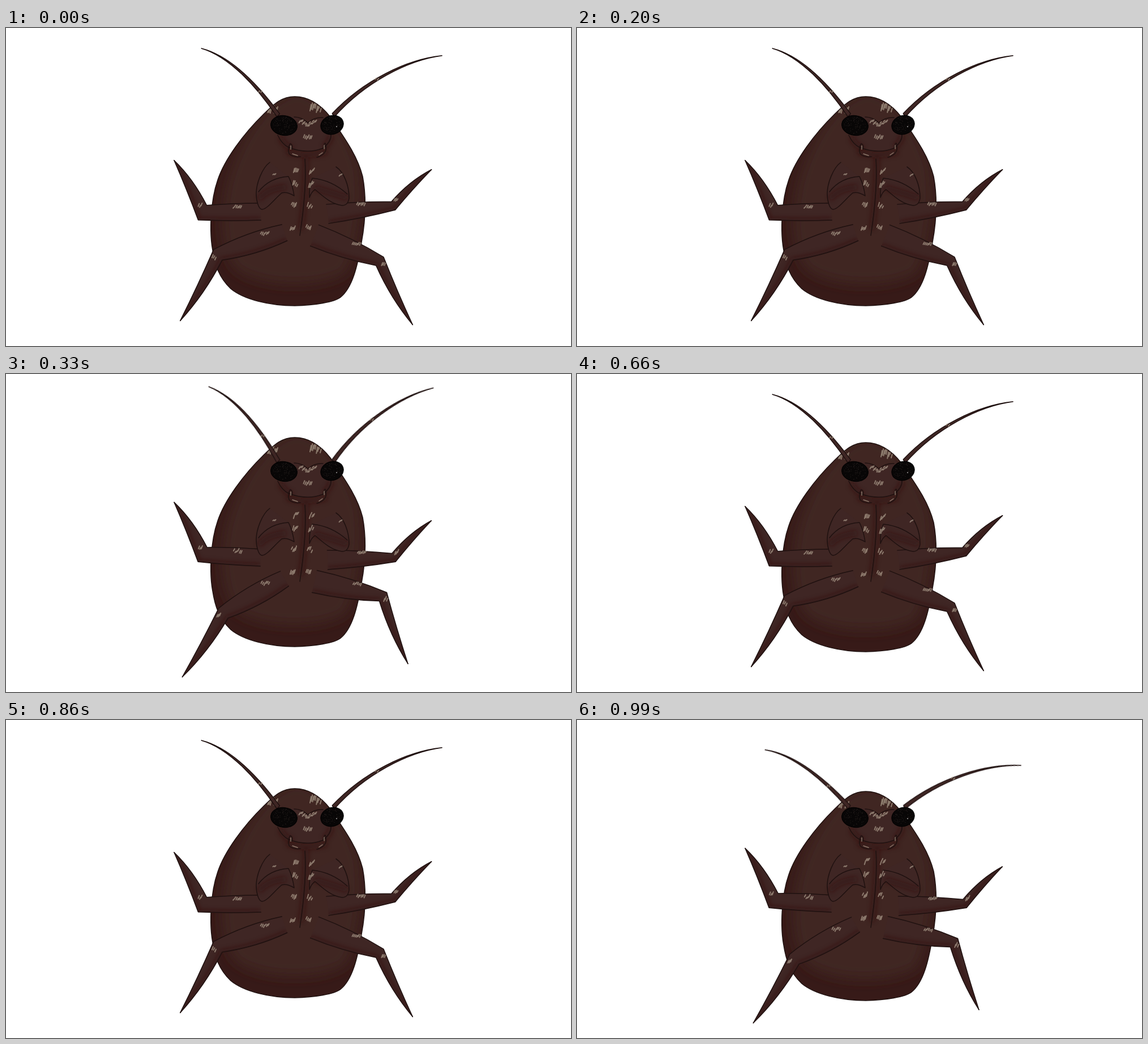
Recreate the animation shown at these times as an HTML page. Size 998x561 px, loop 1320 ms.

```html
<!DOCTYPE html>
<html lang="en">
<head>
<meta charset="utf-8">
<title>Beetle</title>
<style>
  html, body { margin: 0; width: 100%; height: 100%; overflow: hidden; background: #fff; }
  svg { display: block; width: 100%; height: 100%; }
  .skin { fill: #3f2624; }
  .line { fill: none; stroke: #1f1110; stroke-width: 1.5; stroke-linecap: round; stroke-linejoin: round; }
  .soft { fill: none; stroke: #30110f; stroke-width: 8; opacity: .6; filter: url(#blur); }
  .mark { fill: none; stroke: #a59685; stroke-width: 2; stroke-linecap: round; opacity: .75; }
  .eye { fill: #080606; stroke: #000; }
  .facet { fill: #211b1a; }

  .rest, .step { animation: swap 660ms step-end infinite; }
  .step { animation-delay: -330ms; }
  #shell { animation: breathe 1320ms step-end infinite; }
  .feeler { animation: swing 1320ms step-end infinite; }
  @keyframes swap { 0% { opacity: 1 } 50%, 100% { opacity: 0 } }
  @keyframes breathe {
    0%, 50%, 100% { transform: translateY(0) }
    25% { transform: translateY(-9px) }
    75% { transform: translateY(5px) }
  }
  @keyframes swing {
    0%, 50%, 100% { transform: rotate(0deg) }
    25% { transform: rotate(var(--raise)) }
    75% { transform: rotate(var(--lower)) }
  }
</style>
</head>
<body>
<svg viewBox="0 0 998 561">
  <defs>
    <filter id="blur" x="-50%" y="-50%" width="200%" height="200%"><feGaussianBlur stdDeviation="4"/></filter>
    <filter id="haze" x="-20%" y="-20%" width="140%" height="140%"><feGaussianBlur stdDeviation="11"/></filter>
    <path id="egg" d="M510 121C484 121 470 138 455 152C420 186 386 232 374 268C361 305 359 360 365 392C369 418 376 440 397 460C420 479 465 490 510 490C545 489 580 484 591 475C612 458 621 420 628 378C635 340 637 300 630 262C620 222 592 186 573 157C558 138 538 121 510 121Z"/>
    <clipPath id="inEgg"><use href="#egg"/></clipPath>
  </defs>

  <g id="shell">
    <g clip-path="url(#inEgg)">
      <use href="#egg" fill="#371a18"/>
      <path class="skin" filter="url(#haze)" d="M510 110C440 130 395 235 386 290C378 340 380 390 405 425C450 460 560 460 602 430C622 380 634 310 626 250C614 200 565 110 510 110Z"/>
      <g id="shellMarks"></g>
    </g>
    <use href="#egg" class="line"/>
  </g>

  <g id="limbs"></g>

  <g id="thorax">
    <path class="soft" d="M496 219Q532 229 567 219M530 226Q529 300 521 355"/>
    <g id="claws">
      <path class="skin" d="M466 237C452 247 442 275 442 292C442 305 446 319 452 320C462 319 472 304 487 291Q496 288 509 296Q506 276 499 262"/>
      <path class="skin" d="M583 245C597 254 606 278 606 300Q604 313 594 313C575 311 560 297 546 285Q540 288 536 299Q535 280 541 265"/>
      <path class="soft" d="M447 302Q462 283 494 281M603 300Q580 292 545 282"/>
      <path class="line" d="M466 237C452 247 442 275 442 292C442 305 446 319 452 320C462 319 472 304 487 291Q496 288 509 296Q506 276 499 262Q465 264 446 289"/>
      <path class="line" d="M583 245C597 254 606 278 606 300Q604 313 594 313C575 311 560 297 546 285Q540 288 536 299Q535 280 541 265Q575 268 603 293"/>
    </g>
    <path class="line" d="M528 231C531 275 526 320 519 366"/>
  </g>

  <g id="spots"></g>
  <g id="feelers"></g>

  <g id="head">
    <path class="skin" d="M484 160Q500 154 515 157L533 167L560 157L577 163Q580 190 561 212Q533 222 505 214Q482 200 484 160Z"/>
    <path class="soft" d="M484 193Q494 210 506 212M562 210Q573 200 575 188"/>
    <path class="line" d="M509 157Q522 157 533 167Q545 157 560 158M480 189Q487 205 500 211Q533 223 560 212Q575 200 574 188"/>
    <path class="line" d="M505 214Q507 205 502 204Q497 211 500 222Q508 229 520 227M561 213Q561 203 564 203Q568 213 562 221Q556 227 549 228"/>
    <path class="mark" style="stroke-width:1.5" d="M503 208V214M506 222L515 225M562 207V213M559 220L553 224"/>
  </g>
  <g id="eyes"></g>
</svg>
<script>
const NS = 'http://www.w3.org/2000/svg';
const byId = id => document.getElementById(id);
let seed = 7, clips = 0;
const rand = () => (seed = seed * 16807 % 2147483647) / 2147483647;

function add(parent, tag, attrs) {
  const el = document.createElementNS(NS, tag);
  for (const key in attrs) el.setAttribute(key, attrs[key]);
  return parent.appendChild(el);
}

// Vector helpers; angles in degrees, clockwise from the right.
const rad = deg => deg * Math.PI / 180;
const unit = deg => [Math.cos(rad(deg)), Math.sin(rad(deg))];
const move = ([x, y], [dx, dy], k) => [x + dx * k, y + dy * k];
const mix = ([ax, ay], [bx, by], t) => [ax + (bx - ax) * t, ay + (by - ay) * t];

// A small patch of slanted brush strokes.
function mark(parent, [x, y], w = 10, h = 7) {
  let d = '';
  const n = Math.ceil(w / 2.2);
  for (let i = 0; i < n; i++) {
    const len = h * (.3 + rand() * .4);
    const px = x - w / 2 + w * i / (n - 1), py = y + (rand() - .5) * h * .6 - len / 2;
    d += `M${px + 1} ${py}l-2 ${len}`;
  }
  add(parent, 'path', { class: 'mark', d });
}

// Two-jointed leg: a thick femur to the knee, then a tibia tapering to the tip.
function leg(parent, { hip, femur, tibia, hipWidth, kneeWidth, bulge, spot }, bend) {
  const thigh = femur.angle + femur.turn * bend, shin = tibia.angle + tibia.turn * bend;
  const a = unit(thigh), b = unit(shin);
  const knee = move(hip, a, femur.length), tip = move(knee, b, tibia.length);
  const up = a[0] > 0 ? [a[1], -a[0]] : [-a[1], a[0]];

  // The knee is cut along the bisector of both segments.
  const sum = [b[0] - a[0], b[1] - a[1]], size = Math.hypot(...sum);
  const inward = [sum[0] / size, sum[1] / size];
  const edge = side => {
    const inner = Math.sign((up[0] * inward[0] + up[1] * inward[1]) * side);
    const root = move(hip, up, hipWidth * side), joint = move(knee, inward, kneeWidth * inner);
    const belly = move(mix(root, joint, .5), up, bulge * side);
    const calf = move(mix(joint, tip, .5), inward, inner > 0 ? 9 : 2);
    return { root, joint, belly, calf };
  };
  const top = edge(1), low = edge(-1);
  const upper = `M${top.root}Q${top.belly} ${top.joint}Q${top.calf} ${tip}`;
  const back = `Q${low.calf} ${low.joint}Q${low.belly} ${low.root}`;
  const lower = `M${tip}${back}`, outline = upper + back + 'Z', id = 'leg' + clips++;

  add(add(parent, 'clipPath', { id }), 'path', { d: outline });
  add(parent, 'path', { class: 'skin', d: outline });
  add(add(parent, 'g', { 'clip-path': `url(#${id})` }), 'path', { class: 'soft', d: lower });
  add(parent, 'path', { class: 'line', d: upper });
  add(parent, 'path', { class: 'line', d: lower });
  mark(parent, move(mix(hip, knee, spot), up, hipWidth * .65), 13, 7);
  mark(parent, move(mix(knee, tip, .08), up, 5), 5, 8);
}

const legs = [
  { hip: [450, 324], femur: { length: 103, angle: 179, turn: 4 }, tibia: { length: 105, angle: 241.5, turn: 0 },
    hipWidth: 15, kneeWidth: 15, bulge: 2, spot: .4 },
  { hip: [568, 328], femur: { length: 117, angle: -7, turn: 5 }, tibia: { length: 93, angle: -43.5, turn: -1 },
    hipWidth: 17, kneeWidth: 8, bulge: 3, spot: .52 },
  { hip: [492, 361], femur: { length: 124, angle: 161.6, turn: -11 }, tibia: { length: 134, angle: 119.8, turn: 3 },
    hipWidth: 15, kneeWidth: 12, bulge: 9, spot: .27 },
  { hip: [545, 366], femur: { length: 124, angle: 21.6, turn: -9 }, tibia: { length: 126, angle: 62.6, turn: 7 },
    hipWidth: 20, kneeWidth: 10, bulge: 6, spot: .6 }
];

['rest', 'step'].forEach((name, bend) => {
  const limbs = add(byId('limbs'), 'g', { class: name });
  legs.forEach(l => leg(limbs, l, bend));
  // Pairs of spots follow the slanting midline.
  const spots = add(byId('spots'), 'g', { class: name });
  for (const y of [252, 275, 313, 351])
    for (const side of [-1, 1])
      mark(spots, [527 - (y - 240) * .06 + side * 14, y - 3 * bend], 7, 11);
});

// Tapered, bowed feeler growing from its base.
function feeler(side, base, length, rise, near, far, spot, raise, lower) {
  const along = [side * Math.cos(rad(rise)), -Math.sin(rad(rise))];
  const across = [side * along[1], -side * along[0]];
  const at = (t, bow, w) => move(move(base, along, length * t), across, length * bow + w);
  const tip = at(1, 0, 0), w = 3.6;
  const d = `M${tip}C${at(.74, far, w * .3)} ${at(.35, near, w * .65)} ${at(0, 0, w)}` +
    `L${at(0, 0, -w)}C${at(.35, near, -w * .65)} ${at(.74, far, -w * .3)} ${tip}Z`;
  const g = add(byId('feelers'), 'g', {
    class: 'feeler',
    style: `transform-origin:${base[0]}px ${base[1]}px;--raise:${raise}deg;--lower:${lower}deg`
  });
  add(g, 'path', { class: 'skin', d });
  add(g, 'path', { class: 'line', d });
  mark(g, at(spot, near * .75, 0), 4, 4);
}
feeler(-1, [481, 154], 180, 41, .085, .125, .29, 6, -6.7);
feeler(1, [578, 154], 219, 28.7, .12, .105, .45, -7.5, 9);

mark(byId('shellMarks'), [470, 143], 18, 14);
mark(byId('shellMarks'), [547, 140], 18, 17);
for (const x of [474, 591]) mark(byId('spots'), [x, 259], 3, 4);
for (let x = -12; x <= 12; x += 6) mark(byId('head'), [533 + x, 171 - Math.abs(x) * .5], 5, 5);
mark(byId('head'), [533, 193], 13, 8);

function eye(cx, cy, rx, ry, tilt) {
  const g = add(byId('eyes'), 'g', { transform: `translate(${cx} ${cy}) rotate(${tilt})` });
  add(g, 'ellipse', { class: 'eye', rx, ry });
  for (let i = 0; i < rx * 3; i++) {
    const [x, y] = unit(rand() * 360), r = Math.sqrt(rand()) * .85;
    add(g, 'circle', { class: 'facet', cx: x * rx * r, cy: y * ry * r, r: .7 });
  }
}
eye(491, 172, 23.5, 17.5, 8);
eye(576, 171, 20.5, 16.5, -18);
add(byId('eyes'), 'circle', { cx: 584, cy: 174, r: .8, fill: '#fff' });
</script>
</body>
</html>
```
